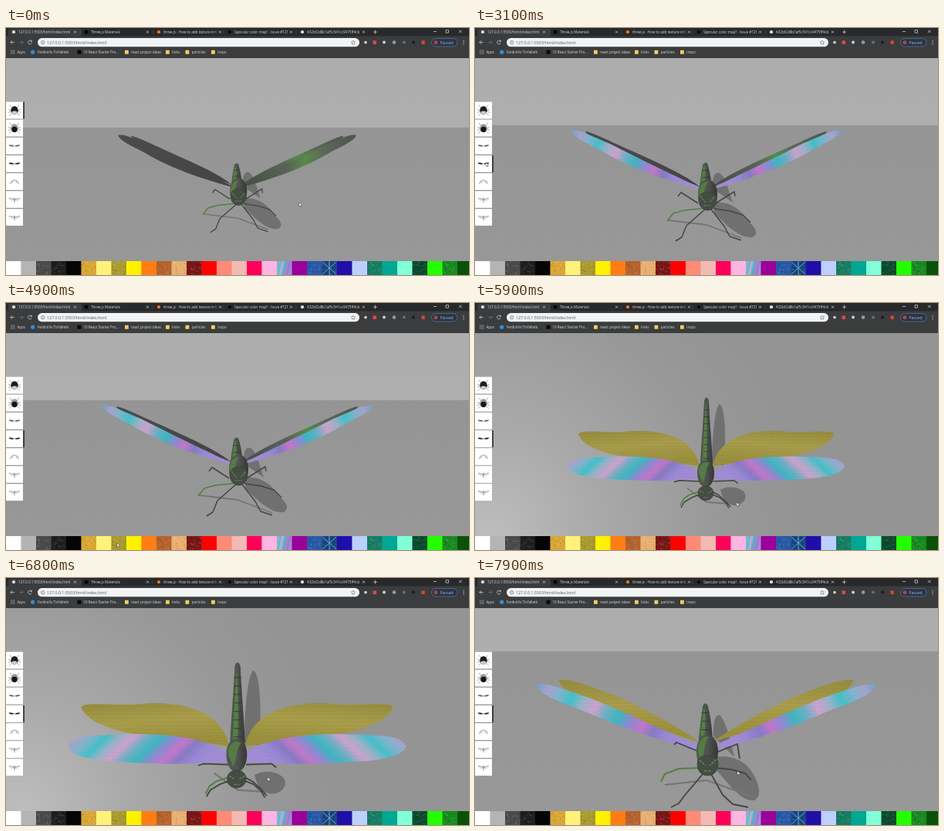
An HTML page for the animation above (8000 ms loop, 600x320 px).

```html
<!DOCTYPE html>
<html lang="en">
<head>
<meta charset="utf-8">
<title>Dragonfly texture editor</title>
<style>
html, body { margin: 0; width: 100%; height: 100%; overflow: hidden; background: #8e8e8e; }
svg { display: block; }
text { font-family: "Open Sans", "Noto Sans", sans-serif; font-size: 4.6px; }
</style>
</head>
<body>
<svg id="stage" width="600" height="320" viewBox="0 0 600 320">
  <defs>
    <linearGradient id="sky" x2="0" y2="1"><stop stop-color="#acacac"/><stop offset="1" stop-color="#b2b2b2"/></linearGradient>
    <linearGradient id="floor" x2="0" y2="1"><stop stop-color="#959595"/><stop offset="1" stop-color="#9b9b9b"/></linearGradient>
    <radialGradient id="light" gradientUnits="userSpaceOnUse" cx="20" cy="300" r="400">
      <stop stop-color="#bdbdbd"/><stop offset=".35" stop-color="#a9a9a9"/><stop offset=".75" stop-color="#989898"/><stop offset="1" stop-color="#949494"/>
    </radialGradient>
    <linearGradient id="iris" y2=".2"></linearGradient>
    <linearGradient id="gold" x2=".3" y2="1"><stop stop-color="#9a8e3e"/><stop offset=".5" stop-color="#aea24c"/><stop offset="1" stop-color="#a0943e"/></linearGradient>
    <linearGradient id="dark"><stop stop-color="#4b4b4b"/><stop offset="1" stop-color="#434443"/></linearGradient>
    <linearGradient id="moss"><stop stop-color="#4c554b"/><stop offset=".3" stop-color="#5c695a"/><stop offset=".45" stop-color="#568a49"/><stop offset=".6" stop-color="#586556"/><stop offset="1" stop-color="#444b43"/></linearGradient>
    <linearGradient id="shell"><stop stop-color="#4d5a49"/><stop offset=".5" stop-color="#505350"/><stop offset="1" stop-color="#343734"/></linearGradient>
    <pattern id="cells" width="4" height="4" patternUnits="userSpaceOnUse">
      <path d="M0 1L1 0H3L4 1M0 3L1 2H3L4 3" fill="none" stroke="#222" stroke-width=".5"/>
    </pattern>
  </defs>
  <rect width="600" height="320" fill="url(#sky)"/>
  <g id="ground"><rect width="600" height="400" fill="url(#floor)"/></g>
  <rect id="glow" width="600" height="320" fill="url(#light)"/>
  <g id="insect" stroke-linejoin="round"></g>
  <g id="panel"></g>
  <g id="chrome"></g>
  <path id="cursor" d="M0 0V5.2L1.3 4.1L2.1 6L3 5.6L2.2 3.8H3.8Z" fill="#fff" stroke="#222" stroke-width=".4"/>
</svg>
<script>
const $ = id => document.getElementById(id);
const NUM = /-?\d+(\.\d+)?/g;
const CX = 299.5, CY = 182, MID_ZOOM = 1.22, MID = 0.2;

function add(parent, tag, attrs, text) {
  const el = document.createElementNS('http://www.w3.org/2000/svg', tag);
  for (const name in attrs) el.setAttribute(name, attrs[name]);
  if (text) el.textContent = text;
  parent.appendChild(el);
  return el;
}
function seeded(seed) {
  return () => (seed = (seed * 16807) % 2147483647) / 2147483647;
}
function mixPath(a, b, k) {
  const other = b.match(NUM);
  let i = 0;
  return a.replace(NUM, n => (+n + (other[i++] - n) * k).toFixed(2));
}
// The middle view is drawn enlarged; bring it to the scale of the others.
function shrink(d) {
  let i = 0;
  return d.replace(NUM, n => {
    const c = i++ % 2 ? CY : CX;
    return ((n - c) / MID_ZOOM + c).toFixed(2);
  });
}
// Value at time t from [time, value...] keys, eased between them.
function track(keys, t, column = 1) {
  let i = 0;
  while (i < keys.length - 1 && keys[i + 1][0] <= t) i++;
  const a = keys[i], b = keys[i + 1];
  if (!b) return a[column];
  const u = (t - a[0]) / (b[0] - a[0]);
  return a[column] + (b[column] - a[column]) * u * u * (3 - 2 * u);
}

// ---- insect: every part has a low, a middle and a high camera view
const insect = $('insect');
const parts = [];
function part(attrs, low, mid, high) {
  const el = add(insect, 'path', attrs);
  parts.push({ el, low, mid: shrink(mid), high });
  return el;
}
const MIRROR = `translate(${2 * CX}) scale(-1 1)`;
function wingPair(meshOpacity, low, mid, high) {
  return ['', MIRROR].map(transform => {
    const base = part({ transform }, low, mid, high);
    const mesh = part({ transform, fill: 'url(#cells)', opacity: meshOpacity }, low, mid, high);
    return { base, mesh };
  });
}
const line = (stroke, width, extra) => ({ fill: 'none', stroke, 'stroke-width': width, ...extra });

const SHADOW = { fill: '#707070' };
part(SHADOW,
  'M308 208C307 190 312 186 317 188C324 192 328 208 334 226Z',
  'M309 205C308 182 313 176 318 178C326 190 330 205 336 232Z',
  'M307 210C307 174 311 133 317 131C325 136 325 180 323 210Z');
part(SHADOW,
  'M310 226C330 224 345 236 350 246C360 256 370 264 360 271C344 273 328 258 310 240Z',
  'M312 232C335 228 352 240 358 250C366 262 374 282 362 288C345 290 330 268 312 248Z',
  'M318 242C328 236 345 238 350 247C353 255 345 262 337 262C329 262 321 256 318 242Z');
part(line('#757575', 1.8),
  'M250 249L300 255L345 272', 'M246 268L300 262L365 285', 'M275 240L300 258L330 260');

part({ fill: 'url(#shell)' },
  'M291 207C292 195 294 184 295 178C297 173 301 173 302 178C304 185 306 195 307 207Z',
  'M290 210C291 194 294 176 295 167C296 161 301 161 302 167C305 178 307 194 308 210Z',
  'M292 208C293 185 296 150 297 127C298 121 302 121 303 127C304 150 307 185 308 208Z');
part({ fill: '#547f45' },
  'M293 202C294 190 296 180 297 177C299 185 299 195 297 204Z',
  'M292 204C294 190 296 172 297 167C299 180 299 195 297 206Z',
  'M295 204C296 175 298 140 299 129C301 150 301 180 300 204Z');
part(line('#262a26', 8, { 'stroke-dasharray': '1 8', opacity: .6 }),
  'M298 184L299 203', 'M298 174L299 205', 'M300 138L300 205');

const hind = wingPair(.25,
  'M292 206C255 192 205 174 165 152C154 146 146 140 143 134C152 135 175 147 205 160C245 178 275 192 292 206Z',
  'M290 212C240 197 185 179 145 162C125 153 112 142 108 132C126 130 150 141 178 151C215 167 265 193 290 212Z',
  'M291 211C265 208 225 203 194 199C165 195 138 184 134 170C138 164 160 168 190 167C245 161 284 176 291 211Z');
const front = wingPair(.14,
  'M291 209C250 198 200 181 162 158C145 149 128 142 124 133C134 130 150 140 175 150C210 168 260 192 291 207Z',
  'M289 223C240 211 185 192 145 174C110 160 82 152 80 138C95 135 125 148 150 156C200 176 250 200 289 217Z',
  'M289 228C255 231 215 231 175 228C148 227 122 222 120 211C125 199 150 200 180 199C230 197 268 204 289 218Z');

const LEG = line('#434643', 1.5), GREEN_LEG = line('#518040', 1.6);
part(LEG, 'M289 227L267 213L263 218', 'M288 224L261 213L258 216', 'M290 231L264 230L258 232');
part(LEG, 'M312 227L336 212L337 218', 'M313 226L340 215L343 234', 'M309 231L336 230L341 234');
part(GREEN_LEG, 'M294 234L272 236L257 240L249 250', 'M294 246L264 247L246 254L241 264', 'M291 244L277 249L270 254L266 262');
part(LEG, 'M309 234L330 237L347 242L357 252', 'M311 246L332 248L350 253L358 262', 'M307 244L316 249L324 256L331 264');
part(LEG, 'M298 235L274 256L268 271L260 276', 'M296 253L273 280L264 292L254 297', 'M294 247L281 252L271 258L267 265');
part(LEG, 'M306 235L323 257L330 270L345 275', 'M306 254L321 281L334 293L354 297', 'M305 247L317 252L325 259L329 266');

part({ fill: 'url(#shell)' },
  'M289 215C289 190 314 190 314 215C314 243 289 243 289 215Z',
  'M287 225C287 196 315 196 315 225C315 258 287 258 287 225Z',
  'M288 220C288 198 310 198 310 220C310 245 288 245 288 220Z');
part({ fill: '#578746', opacity: .75 },
  'M290 216C290 203 298 198 302 200C296 206 297 222 294 229Z',
  'M289 226C289 208 298 204 303 206C296 214 298 230 293 240Z',
  'M290 220C290 206 300 205 304 208C298 214 300 226 295 233Z');
part({ fill: '#454c43', stroke: '#333732', 'stroke-width': .5 },
  'M290 222C290 209 313 209 313 222C313 241 290 241 290 222Z',
  'M288 241C288 226 315 226 315 241C315 261 288 261 288 241Z',
  'M289 246C289 234 309 234 309 246C309 259 289 259 289 246Z');
part(line('#5f8a50', 1.2, { 'stroke-dasharray': '3 1' }),
  'M292 218L299 226M310 219L304 226M296 230L306 230',
  'M291 236L299 243M313 235L304 243M297 250L306 250',
  'M291 243L296 246M308 243L302 246M296 252L302 252');

const IRIS = '#6aa6cc #a9a6d0 #7fb8d0 #45c3cc #9fb4cc #d0a4d0 #6fb2c8 #3fb9c4 #8f8cd6 #c47acb #8a7cc8 #9b8ad8 #a48ed8'.split(' ');
IRIS.forEach((color, i) => add($('iris'), 'stop', { offset: i / (IRIS.length - 1), 'stop-color': color }));

// ---- thumbnails and swatches
const panel = $('panel');
const thumbY = i => 95.7 + i * 23.1;
const thumbArt = [beetle, beetle, wings, wings, legs, fly, fly];
function beetle(g, i) {
  add(g, 'path', { d: 'M5 4L8 8M17 4L14 8M3 10L8 11L3 14M19 10L14 11L19 14M4 18L8 14M18 18L14 14', fill: 'none', stroke: '#888', 'stroke-width': .7 });
  add(g, 'ellipse', { cx: 11, cy: 11, rx: 4.6, ry: 5.5, fill: i ? '#999' : '#1c1c1c' });
  add(g, 'ellipse', { cx: 11, cy: i ? 12.5 : 14, rx: 3.6, ry: i ? 3.6 : 2.2, fill: i ? '#161616' : '#ccc' });
}
function wings(g, i) {
  add(g, 'path', {
    d: 'M11 11C8 9.3 5 9.3 3.5 9.7C4.5 11.6 8.5 12 11 11C13.5 12 17.5 11.6 18.5 9.7C17 9.3 14 9.3 11 11Z',
    fill: i === 2 ? '#555' : '#222'
  });
}
function legs(g) {
  add(g, 'path', { d: 'M5.5 14L7 10.5L10 9H12L15 10.5L16.5 14M8 13L9 10.5M14 13L13 10.5', fill: 'none', stroke: '#777', 'stroke-width': .7 });
}
function fly(g) {
  add(g, 'path', { d: 'M11 10.5L4.5 9L4 10L11 11.5L18 10L17.5 9ZM11 11.5L6 12.5M11 11.5L16 12.5', fill: '#bbb', stroke: '#aaa', 'stroke-width': .5 });
  add(g, 'path', { d: 'M11 8.5V15', stroke: '#777', 'stroke-width': .9 });
}
thumbArt.forEach((art, i) => {
  const g = add(panel, 'g', { transform: `translate(0 ${thumbY(i)})` });
  add(g, 'rect', { width: 22, height: 21.8, fill: '#fff' });
  art(g, i);
});
const marker = add(panel, 'rect', { x: 22.4, width: 1.3, height: 22, fill: '#111' });

// A trailing * marks a textured swatch.
const SWATCHES = ('#ffffff #b4b4b4 #4a4a4a* #1e1e1e* #050505 #d9a733* #fff27a #a89a2e* #fff200 #ff7d12 #b5622c* ' +
  '#e8b070* #7a1616* #ff0000 #ff8a78 #f5b9b3 #ff0058 #ffb5e2 iris #9b009b #2859a8* #17427d* #1f0fa8 #bccfff ' +
  '#167d63* #00a792 #80ffd8 #0b4a2c* #24ff00 #178a1f* #0a520a').split(' ');
const STEP = 19.5, random = seeded(41);
SWATCHES.forEach((spec, i) => {
  const x = i * STEP, color = spec.replace('*', '');
  add(panel, 'rect', { x, y: 302, width: STEP + .3, height: 18, fill: color === 'iris' ? 'url(#iris)' : color });
  if (!spec.endsWith('*')) return;
  for (let n = 0; n < 22; n++) {
    const px = x + random() * 17, py = 303 + random() * 15;
    add(panel, 'path', { d: `M${px} ${py}l2 1.5`, stroke: n % 3 ? '#fff' : '#000', 'stroke-width': .7, opacity: .25 });
  }
});
add(panel, 'path', { d: 'M410 303L428 319M428 303L410 319M419 302V320', stroke: '#6ba8d5', 'stroke-width': 1 });

// ---- browser window
const chrome = $('chrome');
const box = (x, y, width, height, fill, rx = 0) => add(chrome, 'rect', { x, y, width, height, fill, rx });
const dot = (cx, cy, r, fill) => add(chrome, 'circle', { cx, cy, r, fill });
const label = (x, y, text, fill, size) => add(chrome, 'text', { x, y, fill, style: size ? `font-size:${size}px` : '' }, text);
const stroke = (d, color = '#ddd', width = .7) => add(chrome, 'path', { d, fill: 'none', stroke: color, 'stroke-width': width });

box(0, 0, 600, 39, '#3a3c3e');
box(0, 0, 600, 10.5, '#28292b');
box(3, 1, 95, 10, '#3a3c3e', 2);
[
  [10, '127.0.0.1:5503/html/index.html', '#ddd'],
  [104, 'Three.js Materials', '#050505'],
  [198, 'three.js - How to add texture in t', '#e87922'],
  [290, 'Specular color map? · Issue #721', '#08090a'],
  [384, '432bf2d8b1af5c541cc9475ff4cb', '#ddd']
].forEach(([x, title, icon], i) => {
  if (i === 1) box(x - 2.2, 3, 4.4, 4.4, icon); else dot(x, 5.2, 2.1, icon);
  label(x + 6, 6.9, title, '#d8d8d8', 4.6);
  const c = x + 79.5;
  stroke(`M${c - 1.5} 3.7l3 3m0 -3l-3 3`);
  if (i) stroke(`M${x - 8} 3V8`, '#55585b', .5);
});
stroke('M476 5.2h5M478.5 2.7v5');
stroke('M554 4.5h4M570 2.7h3.5v3.5h-3.5zM587 2.7l3.6 3.6m0 -3.6l-3.6 3.6');

stroke('M11 18.5H6M8 16.2L5.8 18.5L8 20.8');
stroke('M17 18.5h5M20 16.2l2.2 2.3L20 20.8', '#777');
stroke('M33 17.2A2.4 2.4 0 1 0 33.2 19.5M33.4 15.7V17.6H31.5');
box(41, 13, 417, 11.3, '#f2f3f4', 5.6);
add(chrome, 'circle', { cx: 47.7, cy: 18.7, r: 2.2, fill: 'none', stroke: '#555', 'stroke-width': .6 });
stroke('M47.7 18.3v1.5M47.7 17.2v.5', '#555', .5);
label(53, 20.6, '127.0.0.1:5503/html/index.html', '#55585c', 5.3);
stroke('M450 16l.8 1.8 2 .2-1.5 1.3.5 2-1.8-1.1-1.8 1.1.5-2-1.5-1.3 2-.2z', '#555', .5);
dot(466, 18.6, 1.9, '#d8cbbd');
box(475.5, 16.4, 4.6, 4.6, '#d94848');
dot(490, 18.6, 2, '#d0d0d0');
dot(503, 18.6, 2.3, '#96999c');
dot(516, 18.6, 2, '#6c6f72');
dot(528, 18.6, 2, '#1c1d1e');
box(538.5, 16.4, 4.2, 4.6, '#d9482d');
add(chrome, 'rect', { x: 551.5, y: 13.6, width: 33.5, height: 10.4, rx: 5.2, fill: '#2d3440', stroke: '#5f86c4', 'stroke-width': .6 });
dot(557, 18.8, 2.5, '#a8483f');
label(562.5, 20.6, 'Paused', '#8fb5f0', 5);
[16.3, 18.7, 21.1].forEach(y => dot(593, y, .6, '#ddd'));

for (let n = 0; n < 9; n++) box(6 + n % 3 * 2, 28.5 + Math.floor(n / 3) * 2, 1.3, 1.3, ['#d9695f', '#63a56b', '#6f91cf'][n % 3]);
const bookmark = (x, text) => label(x, 33, text, '#dadcde', 4.5);
bookmark(14.5, 'Apps');
dot(34.7, 31.2, 2.6, '#2f8fd8');
bookmark(41, 'Ferdinillo Tirifalletti');
box(92.5, 28.7, 5, 5, '#080808');
bookmark(100.5, '10 React Starter Pro…');
[[154, 'react project ideas'], [207, 'kicks'], [232.5, 'particles'], [266, 'inspo']].forEach(([x, text]) => {
  box(x, 28.8, 4.8, 5, '#f2cf5e', .6);
  bookmark(x + 8.3, text);
});

// ---- timeline
const LOOP = 8000, FRAME = 100;
const ORBIT = [[0, 0], [5300, 0], [5850, 1], [6850, 1], [7900, MID]];
const ZOOM = [[0, .88], [200, .88], [800, 1], [5950, 1], [6600, MID_ZOOM]];
const POINTER = [
  [0, 380, 226], [800, 380, 226], [1250, 13, 152], [1500, 13, 152], [1900, 306, 309],
  [2250, 360, 309], [2450, 360, 309], [2850, 14, 174], [3700, 14, 174], [4700, 144, 311],
  [5050, 144, 311], [5300, 338, 212], [5850, 339, 258], [6900, 339, 258], [7900, 340, 250]
];
const SELECT_FRONT = 1300, PAINT_FRONT = 2300, SELECT_HIND = 2900, PAINT_HIND = 5000;

function paint(pair, painted, fill) {
  pair.forEach(({ base, mesh }, side) => {
    base.setAttribute('fill', painted ? fill : side ? 'url(#moss)' : 'url(#dark)');
    mesh.setAttribute('visibility', painted ? 'visible' : 'hidden');
  });
}
function render(t) {
  const orbit = track(ORBIT, t), zoom = track(ZOOM, t);
  for (const { el, low, mid, high } of parts) {
    el.setAttribute('d', orbit < MID
      ? mixPath(low, mid, orbit / MID)
      : mixPath(mid, high, (orbit - MID) / (1 - MID)));
  }
  insect.setAttribute('transform', `translate(${CX} ${CY}) scale(${zoom}) translate(${-CX} ${-CY})`);
  const horizon = 126 - 155 * orbit + Math.max(0, 1 - zoom) * 25;
  $('ground').setAttribute('transform', `translate(0 ${horizon})`);
  $('glow').setAttribute('opacity', Math.max(0, (orbit - MID) / (1 - MID)));
  paint(front, t >= PAINT_FRONT, 'url(#iris)');
  paint(hind, t >= PAINT_HIND, 'url(#gold)');
  marker.setAttribute('y', thumbY(t >= SELECT_HIND ? 3 : t >= SELECT_FRONT ? 2 : 0));
  $('cursor').setAttribute('transform', `translate(${track(POINTER, t)} ${track(POINTER, t, 2)})`);
}
const start = performance.now();
function tick() {
  const t = (performance.now() - start) % LOOP;
  render(Math.floor(t / FRAME) * FRAME);
  requestAnimationFrame(tick);
}
tick();
</script>
</body>
</html>
```
